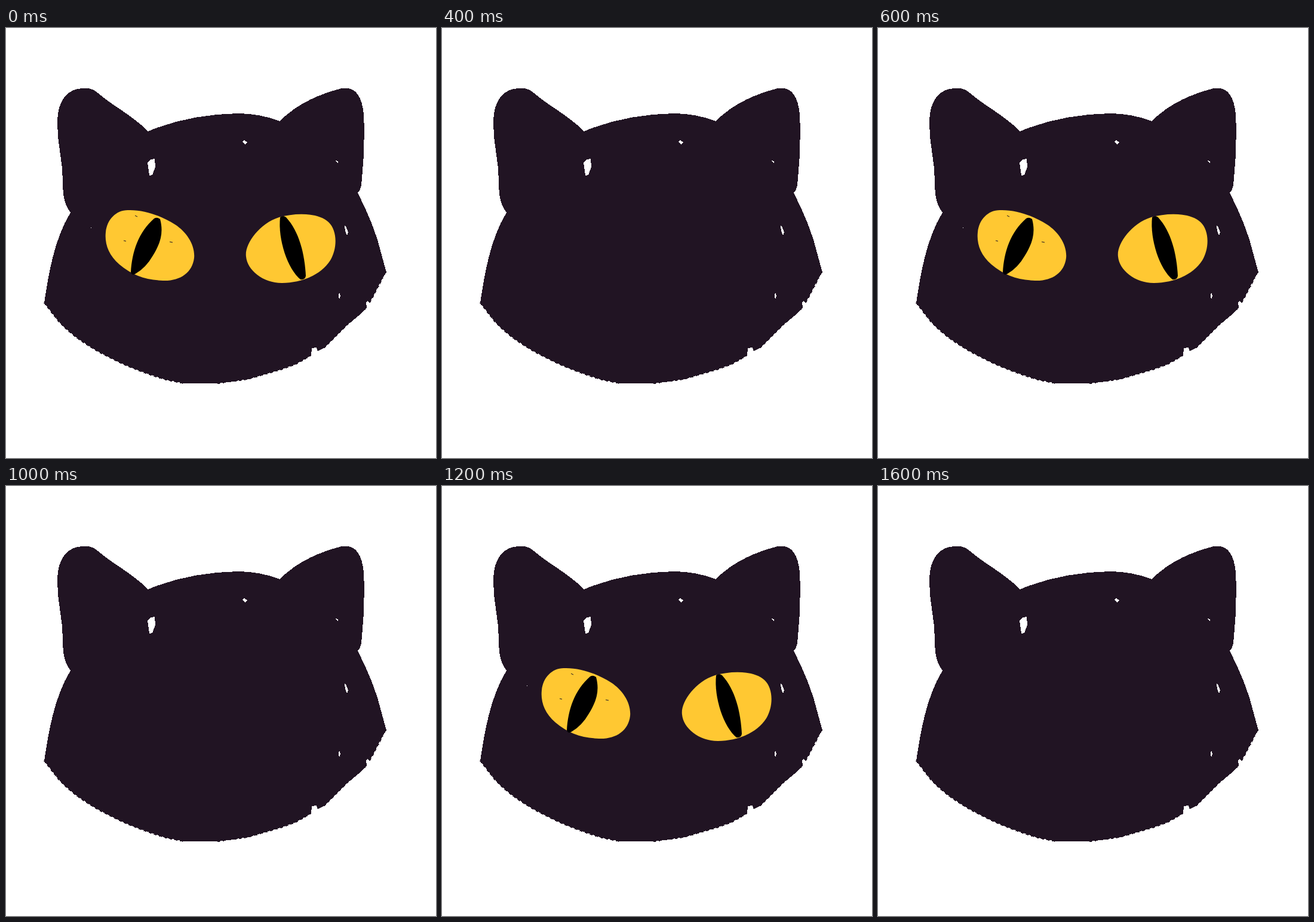
An HTML page that plays this animation: 720x720 px, repeating every 1.8 s.

```html
<!DOCTYPE html>
<html lang="en">
<head>
<meta charset="utf-8">
<title>Blinking cat</title>
<style>
  html, body { margin: 0; width: 100%; height: 100%; overflow: hidden; background: #fff; }
  svg { display: block; width: 100vw; height: 100vh; }
  .fur { fill: #211423; }
  .iris { fill: #ffc832; }
  .rough { fill: none; stroke: #211423; stroke-width: 2; stroke-dasharray: 5 4; }
</style>
</head>
<body>
<svg viewBox="0 0 720 720">
  <g shape-rendering="crispEdges">
    <path class="fur" d="M238 173C282 154 335 144 388 143C415 143 437 148 458 156
      C486 129 517 113 562 101C585 98 596 113 599 145C601 185 599 225 595 262Q594 271 589 276
      C606 310 621 344 630 384L637 409L631 418L609 460L605 457L603 460L604 468L590 482L570 498
      L532 536L522 541L520 535L512 536L511 548L485 563L460 572L405 588L385 591L354 595H298
      L268 589C196 568 113 527 81 482L64 460C71 414 80 355 108 309C99 296 96 288 95 262
      C96 224 85 193 86 155C87 121 103 100 132 101Q144 100 154 109C178 130 211 146 238 173Z"/>
    <path class="rough" d="M64 460L81 482C113 527 196 568 268 589L298 595M354 595L405 588L460 572L485 563L511 548M532 536L570 498L604 468M609 460L631 418"/>
    <path fill="#fff" d="M237 225L242 220L249 219L250 233L245 246L240 247Z
      M396 190L399 188L404 191L400 195Z M552 222L556 223V227Z
      M567 331L569 332L573 342L571 347L568 340Z M558 442L560 449L558 455L557 449Z"/>
  </g>
  <g id="eyes">
    <path class="iris" d="M204 305C231 304 259 314 283 329C303 342 317 364 315 385
      C312 410 291 424 263 423C234 422 211 414 190 396C171 380 165 360 167 342C169 321 184 305 204 305Z"/>
    <path class="iris" d="M402 383C399 363 423 328 457 317C485 309 523 309 540 325
      C555 339 555 369 543 389C528 413 497 426 462 427C430 427 404 405 402 383Z"/>
    <path d="M248 319Q253 316 258 320C264 342 259 360 246 381Q234 402 216 412Q211 415 209 409C211 374 222 342 248 319Z"/>
    <path d="M459 317Q464 313 469 317C491 341 500 378 502 415Q501 422 493 421C472 404 455 355 459 317Z"/>
    <path stroke="#211423" d="M216 314L220 316M197 356L201 357M274 358L279 359"/>
    <path fill="#fff" d="M142 334h1v1h-1z"/>
  </g>
  <path id="lids" class="fur" d="M160 298H325V386Q245 352 160 348Z M395 298H560V354Q475 355 395 387Z"/>
</svg>
<script>
  const STEP = 200;
  const eyes = document.getElementById("eyes");
  const lids = document.getElementById("lids");
  const show = (part, on) => part.style.display = on ? "" : "none";

  // Open, half closed, closed
  function draw() {
    const pose = Math.floor(performance.now() / STEP) % 3;
    show(eyes, pose < 2);
    show(lids, pose === 1);
    requestAnimationFrame(draw);
  }
  draw();
</script>
</body>
</html>
```
